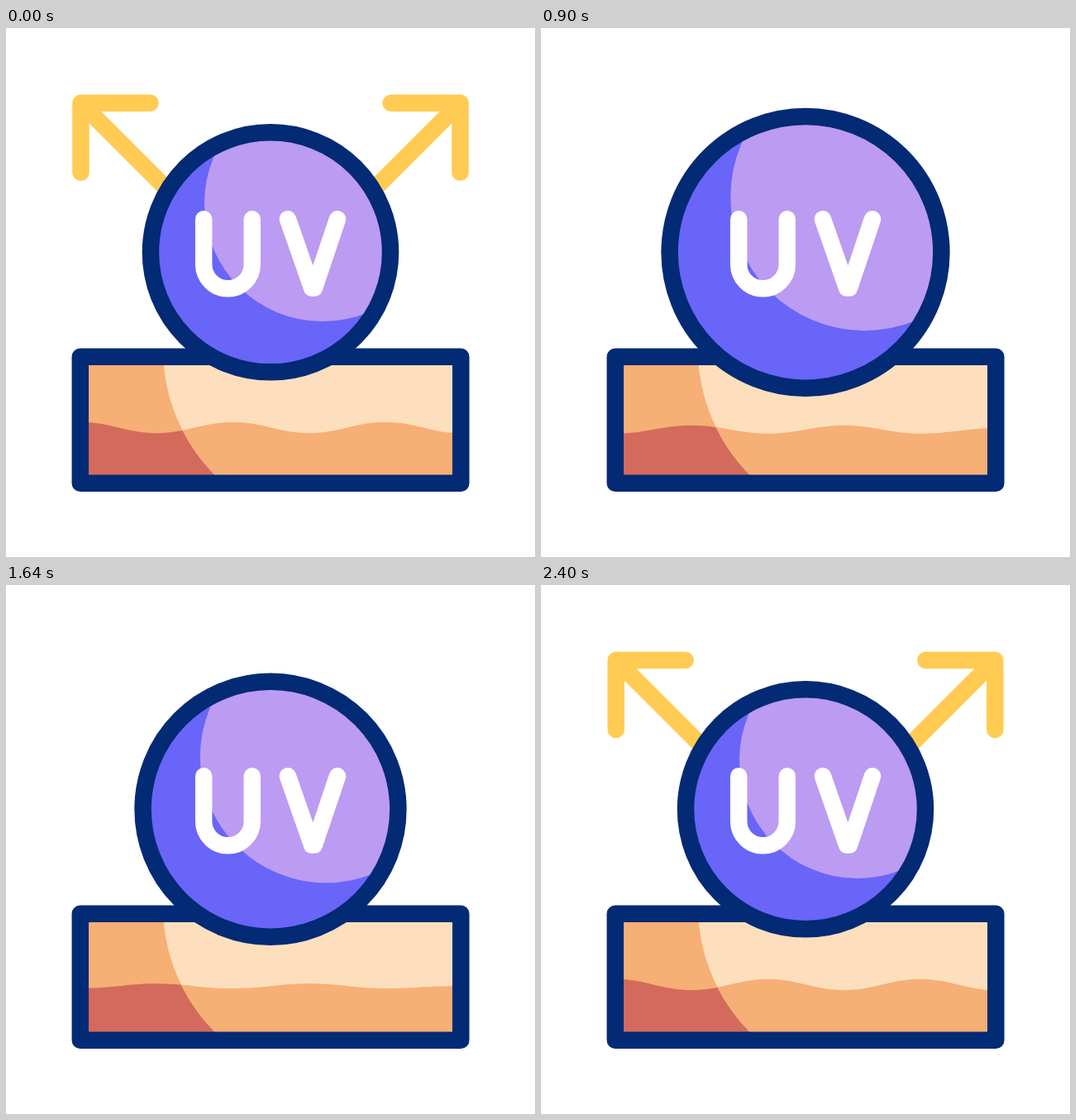
An HTML page for the animation above (2420 ms loop, 640 by 640 pixels).

```html
<!DOCTYPE html>
<html lang="en">
<head>
<meta charset="utf-8">
<title>UV rays on skin</title>
<style>
  html, body { margin: 0; height: 100%; overflow: hidden; background: #fff; }
  svg { display: block; width: 100vw; height: 100vh; }
  .line { fill: none; stroke-width: 20.5; stroke-linecap: round; stroke-linejoin: round; }
  .navy { stroke: #032a74; }
  .yellow { stroke: #ffcb52; }
  .white { stroke: #fff; }
</style>
</head>
<body>
<svg viewBox="0 0 640 640">
  <defs>
    <clipPath id="skin"><rect x="90" y="398" width="460" height="153"/></clipPath>
    <clipPath id="lit"><circle cx="406.8" cy="388" r="217"/></clipPath>
    <clipPath id="ball"><circle cx="320" cy="271.3" r="145"/></clipPath>
    <path id="wave"/>
  </defs>

  <path id="left" class="line yellow" d="M174.7 91H90.7V175M90.7 91L195.8 196"/>
  <path id="right" class="line yellow" d="M465.3 91H549.3V175M549.3 91L444.2 196"/>

  <g clip-path="url(#skin)">
    <path fill="#f6af74" d="M90 398h460v153H90z"/>
    <use href="#wave" fill="#d46a5c"/>
    <g clip-path="url(#lit)">
      <path fill="#fddfbd" d="M90 398h460v153H90z"/>
      <use href="#wave" fill="#f6af74"/>
    </g>
  </g>
  <path class="line navy" d="M89.8 397.8H550.3V550.8H89.8z"/>

  <g id="sun">
    <g clip-path="url(#ball)">
      <circle cx="320" cy="271.3" r="145" fill="#6865f8"/>
      <circle cx="383" cy="212" r="143" fill="#bc9bf2"/>
    </g>
  </g>
  <circle id="ring" class="line navy" cx="320" cy="271.3"/>
  <path class="line white" d="M239.2 231.3V286a29.3 29.3 0 0 0 58.6 0V231.3M341 231.3L370 314.5H373L401 231.3"/>
</svg>
<script>
const LOOP = 2420, END = 2400, RADIUS = 145;
const $ = id => document.getElementById(id);
const mix = (a, b, k) => a + (b - a) * k;

// Quick swell, then a slower, accelerating shrink.
function swell(t) {
  if (t < 600) return 1 - (1 - t / 600) ** 2;
  return t < 2100 ? Math.cos(Math.PI / 2 * (t - 600) / 1500) : 0;
}

function wavePath(t) {
  const k = (1 - Math.cos(2 * Math.PI * t / END)) / 2;
  const crest = mix(476.8, 493, k), dip = mix(490.2, 479, k), last = mix(490.5, 482.8, k);
  const ys = [crest, dip, crest, dip, crest, last];
  let d = `M90 ${crest}`;
  for (let i = 1; i < 6; i++) {
    const x = 90 + 92.2 * i;
    d += `C${x - 57} ${ys[i - 1]} ${x - 35} ${ys[i]} ${x} ${ys[i]}`;
  }
  return d + "V560H90z";
}

// Arrows fly off the stage, then emerge from behind the ball.
function moveArrows(t) {
  const out = t < 1100;
  const y = out ? -0.2457 * t : Math.min(0.24 * (END - t), 120);
  const place = (id, dx) => $(id).setAttribute("transform", `translate(${dx * y} ${y})`);
  place("left", out ? 0.95 : 0.993);
  place("right", out ? -1.027 : -0.975);
}

function draw(now) {
  const t = Math.min(now % LOOP, END);
  const r = RADIUS + 20.4 * swell(t);
  $("ring").setAttribute("r", r);
  $("sun").setAttribute("transform", `translate(320 271.3) scale(${r / RADIUS}) translate(-320 -271.3)`);
  $("wave").setAttribute("d", wavePath(t));
  moveArrows(t);
}

const start = performance.now();
function tick() {
  draw(performance.now() - start);
  requestAnimationFrame(tick);
}
tick();
</script>
</body>
</html>
```
